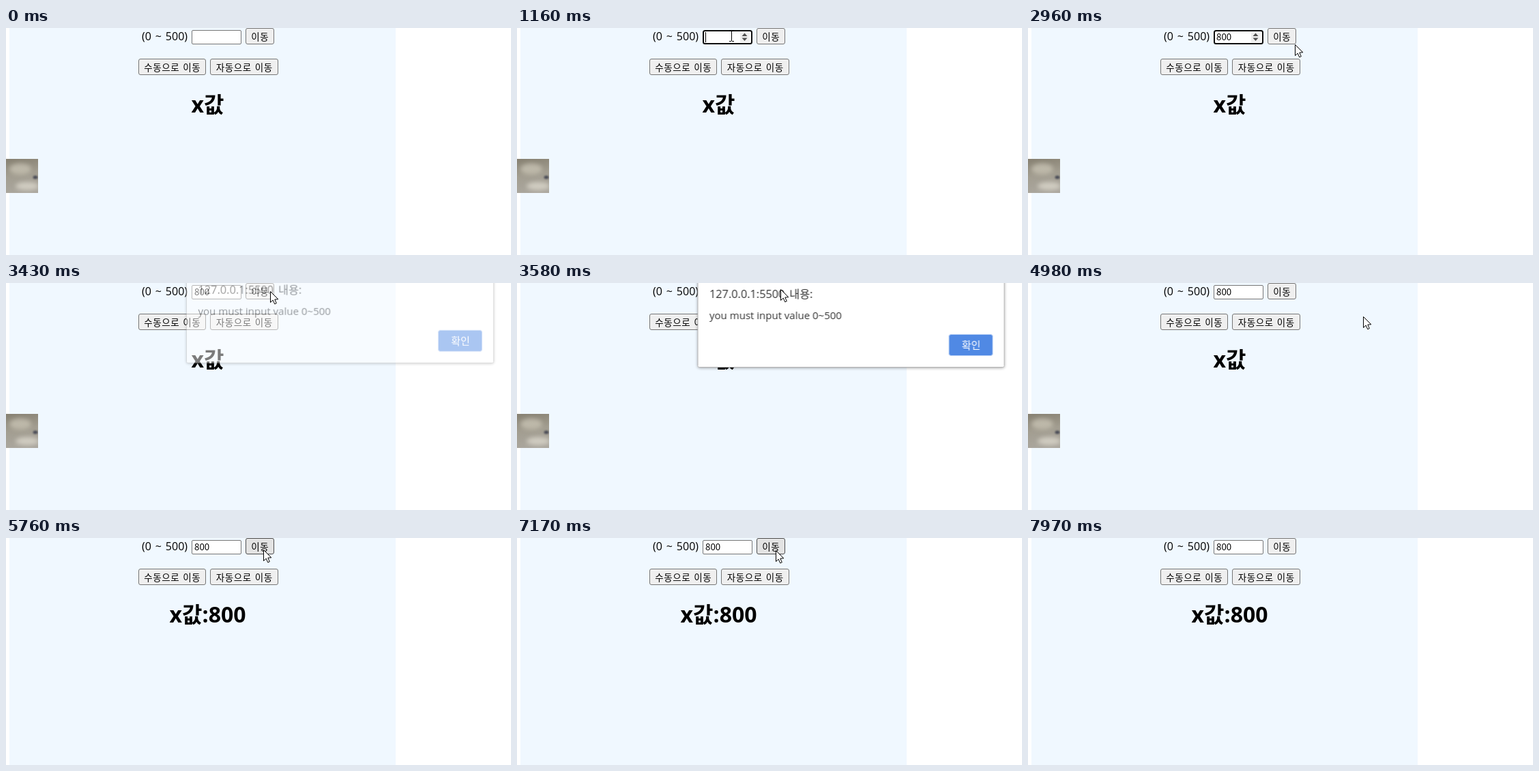
Recreate the animation shown at these times as an HTML page with a canvas. Size 740x333 px, loop 8 s.

```html
<!DOCTYPE html>
<html lang="ko">
<head>
<meta charset="utf-8">
<title>x값</title>
<style>
html, body { margin: 0; width: 100%; height: 100%; overflow: hidden; background: #fff; }
canvas { display: block; }
</style>
</head>
<body>
<canvas id="stage" width="740" height="333"></canvas>
<script>
const stage = document.getElementById('stage').getContext('2d');
const layer = document.createElement('canvas');
layer.width = 740;
layer.height = 333;
let ctx = stage;

const LOOP = 8000, STEP = 77.4;
const SANS = '"Open Sans", "Noto Sans CJK KR", sans-serif';
const KOREAN = '"Noto Sans CJK KR", sans-serif';

const rect = (x, y, w, h) => ({ x, y, w, h });
const INPUT = rect(272, 3, 73, 21);
const MOVE = rect(351, 0, 42, 24);
const MANUAL = rect(194, 45, 99, 24);
const AUTO = rect(299, 45, 100, 24);
const DIALOG = rect(264, -40, 450, 164);
const OK = rect(632, 75, 65, 32);

const clamp = v => Math.max(0, Math.min(1, v));
const phase = (t, from, to) => clamp((t - from) / (to - from));
const ease = f => f * f * (3 - 2 * f);
const inside = (p, r) => p.x >= r.x && p.x < r.x + r.w && p.y >= r.y && p.y < r.y + r.h;

// The pointer rests between eased moves
function pointerAt(t) {
  const p = { x: 609, y: 305 };
  const go = (from, to, x, y) => {
    const f = ease(phase(t, from, to));
    p.x += (x - p.x) * f;
    p.y += (y - p.y) * f;
  };
  go(110, 735, 252, 24);
  go(735, 890, 316, 0);
  go(890, 960, 314, 10);
  go(2530, 2740, 290, 27);
  go(2830, 2975, 391, 24);
  go(3140, 3560, 386, 9);
  go(3700, 4520, 640, 91);
  go(4640, 5290, 377, 17);
  go(7130, 7900, 733, 304);
  return { x: Math.round(p.x), y: Math.round(p.y) };
}

function text(str, x, y, font, { color = '#000', align = 'left', word = 0, letter = 0 } = {}) {
  ctx.font = font;
  ctx.fillStyle = color;
  ctx.textAlign = align;
  ctx.wordSpacing = word + 'px';
  ctx.letterSpacing = letter + 'px';
  ctx.fillText(str, x, y);
}

function box({ x, y, w, h }, r, fill, stroke, line = 1) {
  ctx.beginPath();
  ctx.roundRect(x + line / 2, y + line / 2, w - line, h - line, r);
  ctx.fillStyle = fill;
  ctx.fill();
  if (!stroke) return;
  ctx.strokeStyle = stroke;
  ctx.lineWidth = line;
  ctx.stroke();
}

function blob(x, y, rx, ry, fill) {
  ctx.beginPath();
  ctx.ellipse(x, y, rx, ry, 0, 0, 7);
  ctx.fillStyle = fill;
  ctx.fill();
}

function button(r, label, hover) {
  box(r, 2.5, hover ? '#e3e3e3' : '#efefef', hover ? '#4f4f4f' : '#767676');
  text(label, r.x + r.w / 2 + 0.3, r.y + 17.5, '13.5px ' + KOREAN, { align: 'center', word: 1.4, letter: 0.58 });
}

function spinner(dir) {
  const y = 13.25 + dir * 1.25;
  ctx.beginPath();
  ctx.moveTo(329.5, y);
  ctx.lineTo(333.5, y + dir * 4.5);
  ctx.lineTo(337.5, y);
  ctx.fillStyle = '#505050';
  ctx.fill();
}

function input(t, value, typedAt) {
  const focus = t >= 1090 && t < 3270;
  box(INPUT, focus ? 2.5 : 1.5, '#fff', focus ? '#101010' : '#767676', focus ? 2 : 1);
  text(value, 276, 18, '13.33px ' + KOREAN);
  if (!focus) return;
  ctx.fillStyle = '#efefef';
  ctx.fillRect(327, 6, 14, 15);
  spinner(-1);
  spinner(1);
  ctx.fillStyle = '#000';
  const lit = (t - typedAt) % 1000 < 500;
  if (lit) ctx.fillRect(276 + Math.round(7.4 * value.length), 6, 1, 15);
}

function photo() {
  ctx.save();
  ctx.beginPath();
  ctx.rect(0, 192, 47, 50);
  ctx.clip();
  const g = ctx.createLinearGradient(0, 192, 8, 242);
  g.addColorStop(0, '#868071');
  g.addColorStop(0.5, '#a29d90');
  g.addColorStop(1, '#aaa69d');
  ctx.fillStyle = g;
  ctx.fillRect(0, 192, 47, 50);
  ctx.filter = 'blur(3px)';
  blob(21, 207, 16, 8, '#bdb8a9');
  blob(31, 232, 17, 6, '#d0ccc1');
  ctx.filter = 'blur(1px)';
  blob(43, 219, 3.5, 2.5, '#4c4e58');
  ctx.restore();
}

function paintDialog() {
  ctx = layer.getContext('2d');
  ctx.clearRect(0, 0, 740, 333);
  ctx.shadowColor = 'rgba(0,0,0,.4)';
  ctx.shadowBlur = 4;
  ctx.shadowOffsetY = 1;
  box(DIALOG, 2, '#fff');
  ctx.shadowColor = 'transparent';
  box(DIALOG, 2, '#fff', '#b4b4b4');
  text('127.0.0.1:5500 내용:', 281.5, 22, '16.3px ' + SANS, { color: '#333', word: 2.5 });
  text('you must input value 0~500', 281.5, 53, '15px ' + SANS, { color: '#333' });
  box(OK, 3, '#5089e4', '#b4cdf5');
  text('확인', 665, 96.5, '15px ' + KOREAN, { color: '#fff', align: 'center' });
  ctx = stage;
}

function dialog(alpha, shift, scale) {
  paintDialog();
  ctx.save();
  ctx.globalAlpha = alpha;
  ctx.translate(489.5, shift);
  ctx.scale(scale, 1);
  ctx.drawImage(layer, -489, 0);
  ctx.restore();
}

function arrow({ x, y }) {
  ctx.save();
  ctx.translate(x + 0.5, y + 0.5);
  const shape = new Path2D('M0 0V16L3.7 12.6 6.2 18.3 8.8 17.2 6.3 11.6 11.3 11.3Z');
  ctx.fillStyle = '#fff';
  ctx.fill(shape);
  ctx.strokeStyle = '#000';
  ctx.lineWidth = 1;
  ctx.stroke(shape);
  ctx.restore();
}

function beam({ x, y }) {
  ctx.fillStyle = '#000';
  ctx.fillRect(x, y - 6, 1, 15);
  for (const dy of [-7, 9]) {
    ctx.fillRect(x - 3, y + dy, 3, 1);
    ctx.fillRect(x + 1, y + dy, 3, 1);
  }
}

function draw(t) {
  const m = Math.floor((t + 20) / STEP) * STEP + 40;
  const p = pointerAt(m);
  const visible = t >= 70 && t < 7955;
  const moved = t >= 5450;
  const open = m > 3340 && m < 4875;
  const hover = r => visible && !open && inside(p, r);
  const keys = [1780, 2010, 2180].filter(k => t >= k);

  ctx.fillStyle = '#fff';
  ctx.fillRect(0, 0, 740, 333);
  ctx.fillStyle = '#f0f8ff';
  ctx.fillRect(5, 0, 566, 333);

  text('(0 ~ 500)', 199, 18, '16px ' + SANS, { word: 1.75 });
  input(t, '800'.slice(0, keys.length), keys.at(-1) || 1110);
  button(MOVE, '이동', hover(MOVE));
  button(MANUAL, '수동으로 이동', hover(MANUAL));
  button(AUTO, '자동으로 이동', hover(AUTO));
  text(moved ? 'x값:800' : 'x값', 295.5, 124, 'bold 32px ' + SANS, { align: 'center' });
  if (!moved) photo();

  if (open) {
    const enter = phase(m, 3310, 3590);
    const leave = phase(m, 4575, 4875);
    if (leave) dialog(1 - leave, -6 - 8 * leave, 1.004);
    else dialog(enter, -12 * (1 - enter), 1 + 0.005 * (1 - enter));
  }
  if (!visible) return;
  if (t >= 1085 && !open && inside(p, INPUT)) beam(p);
  else arrow(p);
}

function tick() {
  draw(performance.now() % LOOP);
  requestAnimationFrame(tick);
}
tick();
</script>
</body>
</html>
```
